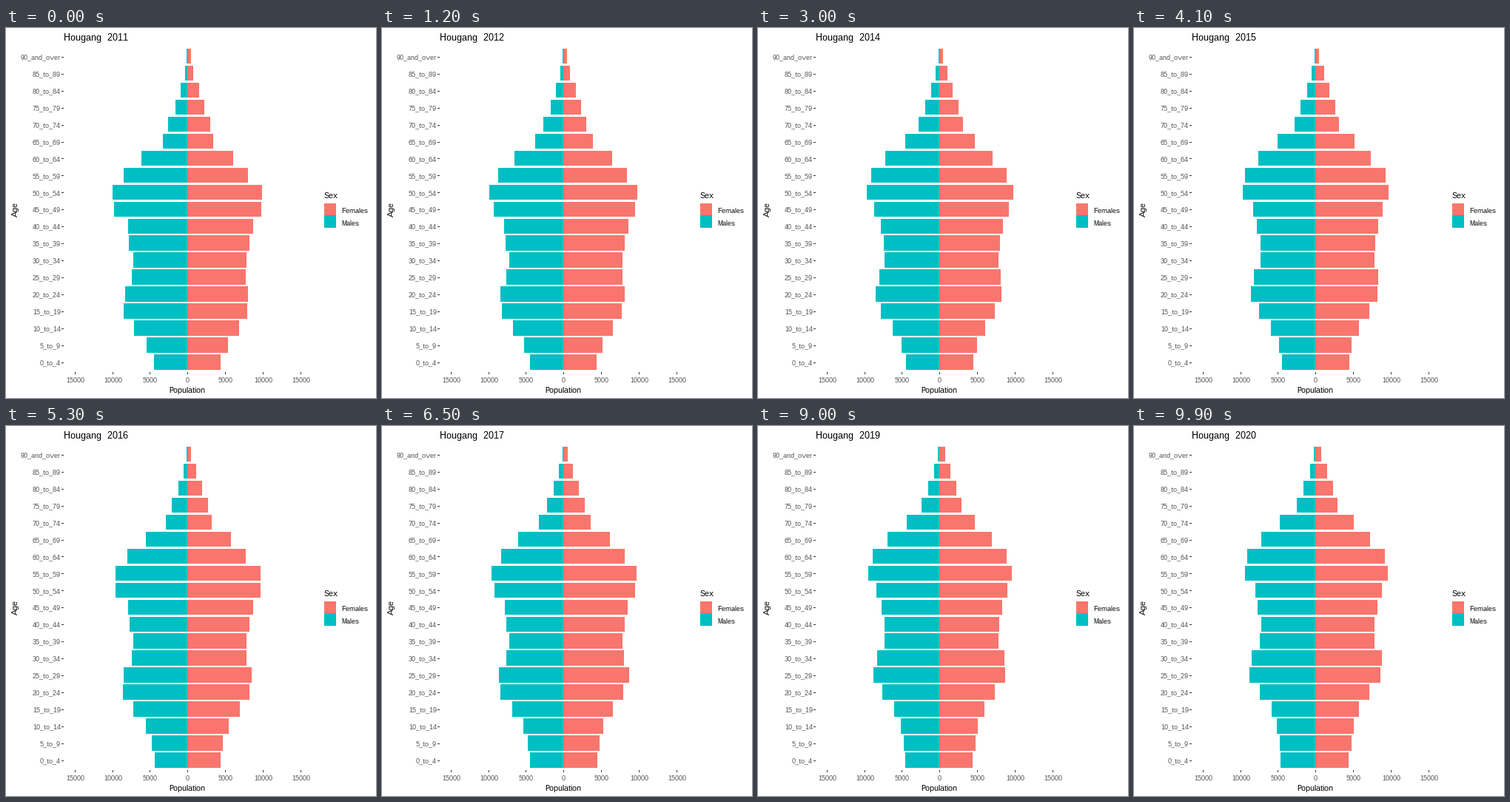
Write a matplotlib script that moves like this. It is 500 px wide and 500 px high and loops after 10 s.

```python
from math import exp, floor

import numpy as np
import matplotlib.pyplot as plt
from matplotlib.animation import FuncAnimation
from matplotlib.patches import Rectangle

SIZE, FRAMES, INTERVAL = 500, 100, 100
FIRST_YEAR, YEARS, GROUP_YEARS = 2011, 9, 5
CORAL, TEAL = "#F8766D", "#00BFC4"
TICK, GREY = "#333333", "#4D4D4D"

LEFT, BOTTOM, CENTRE = 78, 465.9, 245
ROW, STEP_X = 22.97, 50.83   # px per age group, px per 5000 people

AGES = [f"{a}_to_{a + 4}" for a in range(0, 90, 5)] + ["90_and_over"]

# Bar length in px of each cohort in the first year;
# the first two cohorts are not born yet.
MALES = dict(
    cohorts=[47, 42, 45, 55, 72, 86, 84, 75, 73, 79, 80,
             99, 101, 86, 62, 33, 26, 16, 9, 3, 1],
    inflow=0.06, mortality=0.72)
FEMALES = dict(
    cohorts=[45, 43, 45, 55, 70, 81, 82, 79, 80, 84, 89,
             100, 101, 82, 62, 35, 31, 23, 16, 8, 5],
    inflow=0.13, mortality=0.38)


def growth(cohort, inflow, mortality):
    """Relative change of a cohort from the first year to the last."""
    children = 0.14 * exp(-(cohort + 0.4) ** 2)
    young_adults = inflow * exp(-(cohort - 3.8) ** 2)
    deaths = mortality * exp((cohort - 16) / 2.4)
    return children + young_adults - deaths


def bar_length(group, t, cohorts, inflow, mortality):
    """Each cohort climbs the pyramid as it ages; t runs from 0 to 1."""
    cohort = group - t * YEARS / GROUP_YEARS
    start = np.interp(cohort, range(-2, len(AGES)), cohorts)
    return round(start * (1 + t * growth(cohort, inflow, mortality)))


# Native hinting keeps the small text on whole pixels
plt.rcParams.update({"font.family": "Liberation Sans",
                     "text.hinting": "native", "text.hinting_factor": 1})
fig = plt.figure(figsize=(5, 5), dpi=100, facecolor="white")
ax = fig.add_axes([0, 0, 1, 1])
ax.set_xlim(0, SIZE)
ax.set_ylim(SIZE, 0)
ax.axis("off")


def box(x0, y0, x1, y1, color):
    patch = Rectangle((x0, y0), x1 - x0, y1 - y0, facecolor=color,
                      linewidth=0, antialiased=False)
    return ax.add_patch(patch)


def label(x, y, text, px, color="black", ha="left", va="baseline", **kw):
    return ax.text(x, y, text, fontsize=px * 0.72, color=color, ha=ha,
                   va=va, **kw)


male_bars, female_bars = [], []
for i, age in enumerate(AGES):
    cy = BOTTOM - (i + 0.6) * ROW
    top, low = floor(cy - 0.45 * ROW), floor(cy + 0.45 * ROW)
    male_bars.append(box(CENTRE, top, CENTRE, low, TEAL))
    female_bars.append(box(CENTRE, top, CENTRE, low, CORAL))
    tick_y = round(cy)
    box(LEFT - 3, tick_y, LEFT, tick_y + 1, TICK)
    label(LEFT - 4, round(cy + 3.1), age, 9, GREY, ha="right")

for k in range(-3, 4):
    x = floor(CENTRE + 0.7 + k * STEP_X)
    box(x, 465, x + 1, 468, TICK)
    label(x + 0.5, 479, str(abs(k) * 5000), 9, GREY, ha="center")

label(CENTRE - 0.5, 493, "Population", 11, ha="center")
label(17.5, CENTRE, "Age", 11, ha="right", va="center", rotation=90)

label(430, 230, "Sex", 11)
for top, low, name, color in ((237, 253, "Females", CORAL),
                              (253, 270, "Males", TEAL)):
    box(430, top, 446, low, color)
    label(453, low - 3, name, 9)

title = label(LEFT, 17, "", 13)


def draw(n):
    t = n / (FRAMES - 1)
    for i, (male, female) in enumerate(zip(male_bars, female_bars)):
        width = bar_length(i, t, **MALES)
        male.set_x(CENTRE - width)
        male.set_width(width)
        female.set_width(bar_length(i, t, **FEMALES))
    title.set_text(f"Hougang  {FIRST_YEAR + round(t * YEARS)}")
    return [*male_bars, *female_bars, title]


anim = FuncAnimation(fig, draw, frames=FRAMES, interval=INTERVAL,
                     init_func=lambda: draw(0), repeat=True)
plt.show()
```
